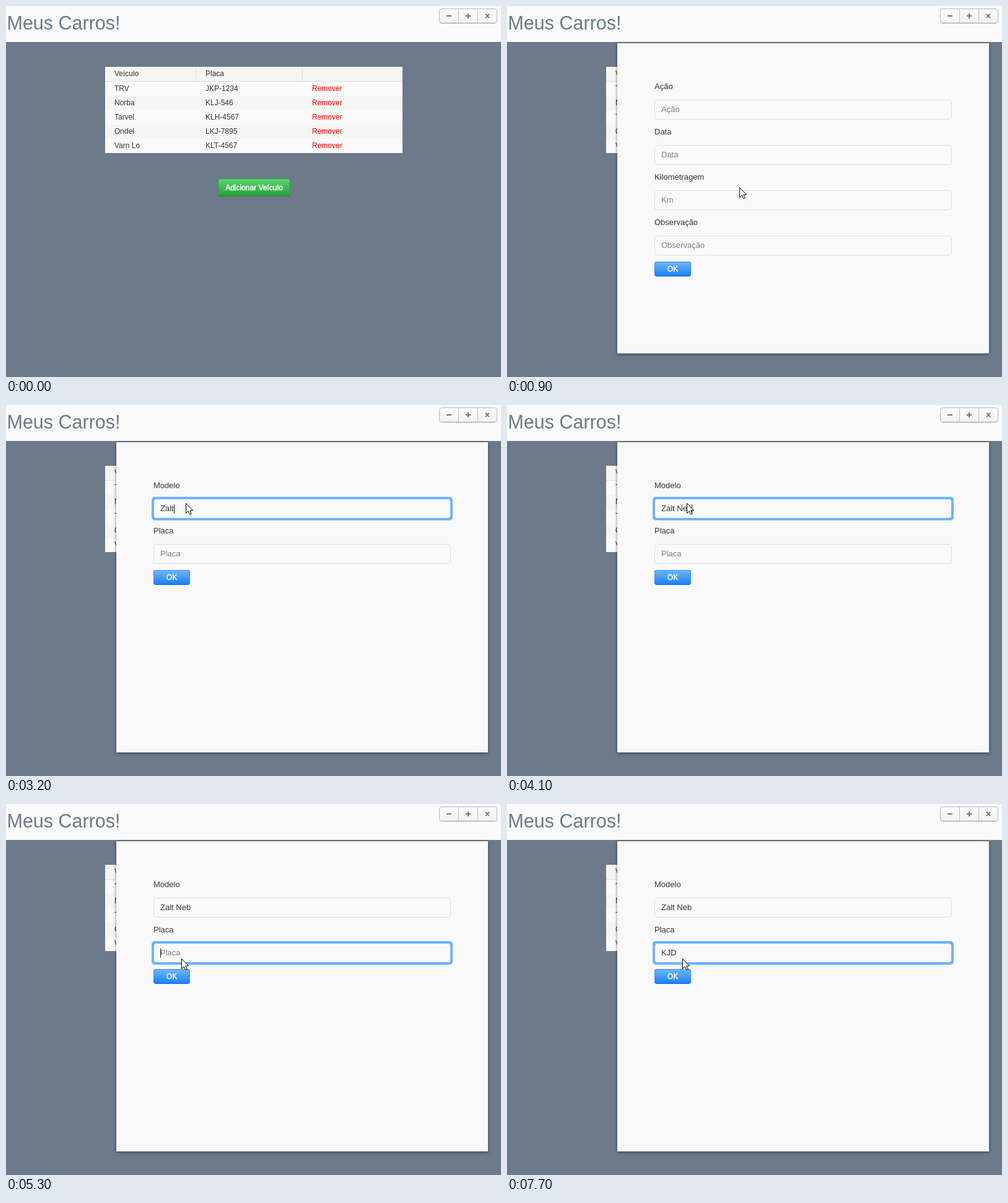
An HTML page for the animation above (8000 ms loop, 799 by 598 pixels).

```html
<!DOCTYPE html>
<html lang="pt">
<head>
<meta charset="utf-8">
<title>Meus Carros!</title>
<style>
html, body { margin: 0; width: 100%; height: 100%; overflow: hidden; background: #6c7a89; }
svg { display: block; }
text { font: 12px "Liberation Sans", Arial, sans-serif; fill: #333; white-space: pre; }
.form text { font-size: 13px; }
.form .hint { fill: #7f7f7f; }
.remove { fill: #f00; }
text.title { font-size: 30.5px; fill: #6c7a89; }
.form text.btn, text.btn { font-size: 12px; fill: #fff; stroke: #fff; stroke-width: .45px; text-anchor: middle; }
.modal { filter: drop-shadow(0 1px 2.5px rgba(0,0,0,.5)); }
</style>
</head>
<body>
<svg width="799" height="598" viewBox="0 0 799 598">
  <defs>
    <linearGradient id="green" x2="0" y2="1"><stop stop-color="#5bd46d"/><stop offset="1" stop-color="#29a03b"/></linearGradient>
    <linearGradient id="blue" x2="0" y2="1"><stop stop-color="#6eb4f7"/><stop offset="1" stop-color="#1a82fb"/></linearGradient>
    <linearGradient id="grey" x2="0" y2="1"><stop stop-color="#fcfcfc"/><stop offset="1" stop-color="#f1f1f1"/></linearGradient>
  </defs>
  <g id="page"></g>
  <g id="dialog" class="form"></g>
  <path id="mouse" d="M.5 .5V16.5L4.2 13L6.7 18.5L9.2 17.4L6.8 12H11.6Z" fill="#fff" stroke="#000"/>
</svg>
<script>
const LOOP = 8000, STEP = 100, BLINK = 500;
const $ = id => document.getElementById(id);

const rect = (x, y, w, h, fill, more = '') =>
  `<rect x="${x}" y="${y}" width="${w}" height="${h}" fill="${fill}" ${more}/>`;
const text = (x, y, s, cls = '') => `<text x="${x}" y="${y}" class="${cls}">${s}</text>`;

function button(x, y, w, h, label, color, edge, base) {
  return rect(x, y, w, h, base, 'rx="4"') +
    rect(x, y, w, h - 1, edge, 'rx="4"') +
    rect(x + 1, y + 1, w - 2, h - 2, `url(#${color})`, 'rx="3"') +
    text(x + w / 2, y + h / 2 + 4, label, 'btn');
}

function drawPage() {
  const cars = [['TRV', 'JKP-1234'], ['Norba', 'KLJ-546'], ['Tarvel', 'KLH-4567'],
    ['Ondel', 'LKJ-7895'], ['Varn Lo', 'KLT-4567']];
  let s = rect(0, 0, 799, 58, '#fafafa') + text(1.5, 38, 'Meus Carros!', 'title');

  s += rect(699, 5, 94, 24, '#000', 'rx="4" opacity=".06"') +
    rect(699.5, 4.5, 93, 23, 'url(#grey)', 'rx="4" stroke="#b9b7b9"') +
    rect(703, 27, 86, 1, '#a19fa1') +
    rect(730, 5, 1, 22, '#c2c0c2') + rect(761, 5, 1, 22, '#c2c0c2') +
    '<path d="M711 16H719M742 16H750M746 12V20M774 13L780 19M780 13L774 19" stroke="#737475" stroke-width="2"/>';

  s += rect(160, 98, 480, 139, '#fafafa') + rect(160, 98, 480, 23, '#f5f5f4') +
    rect(160, 121, 480, 1, '#ddd') +
    rect(306, 98, 1, 23, '#ddd') + rect(478, 98, 1, 23, '#ddd') +
    text(175, 113, 'Veículo') + text(322, 113, 'Placa');
  cars.forEach(([name, plate], i) => {
    const y = 122 + 23 * i;
    if (i % 2) s += rect(160, y, 480, 23, '#f5f5f4');
    s += text(175, y + 15, name) + text(322, y + 15, plate) + text(494, y + 15, 'Remover', 'remove');
  });
  $('page').innerHTML = s +
    button(342, 278, 117, 29, 'Adicionar Veículo', 'green', '#29a03b', '#248b34');
}

function field(row, label, hint, value, focused) {
  const y = 151 + 73 * row;
  return text(238, y - 17, label) +
    (focused ? rect(235, y - 3, 486, 38, '#6db3fd', 'rx="5"') : '') +
    rect(238.5, y + .5, 479, 31, '#f9f9f9', `rx="4" stroke="${focused ? '#6db3fd' : '#ddd'}"`) +
    text(249, y + 20, value || hint, value ? 'value' : 'hint');
}

// Text typed so far, with the time of the last key press
function typed(t, str, times) {
  const n = times.filter(k => k <= t).length;
  return { value: str.slice(0, n), last: n ? times[n - 1] : 0 };
}

function drawDialog(t) {
  const box = $('dialog');
  if (t < 900) { box.innerHTML = ''; return; }
  const ok = y => button(238, y, 59, 24, 'OK', 'blue', '#388df8', '#0866dc');
  let s = rect(178, 60, 600, 500, '#f9f9f9', 'class="modal"');

  if (t < 1000) {
    const rows = [['Ação', 'Ação'], ['Data', 'Data'], ['Kilometragem', 'Km'], ['Observação', 'Observação']];
    rows.forEach(([label, hint], i) => s += field(i, label, hint));
    box.innerHTML = s + ok(412);
    return;
  }

  const model = typed(t, 'Zalt Neb', [2600, 2900, 3000, 3200, 3400, 3700, 3900, 4100]);
  const plate = typed(t, 'KJD', [6200, 6700, 7200]);
  const focus = t < 1600 ? -1 : t < 5300 ? 0 : 1;
  box.innerHTML = s + field(0, 'Modelo', 'Modelo', model.value, focus === 0) +
    field(1, 'Placa', 'Placa', plate.value, focus === 1) + ok(266);

  if (focus < 0) return;
  const active = [model, plate][focus];
  const since = t - Math.max(active.last, [1600, 5300][focus]);
  if (Math.floor(since / BLINK) % 2) return;
  const width = active.value ? box.querySelectorAll('.value')[focus].getComputedTextLength() : 0;
  box.innerHTML += rect(Math.round(249 + width), 160 + 73 * focus, 1, 15, '#222');
}

const path = [[100, 520, 500], [400, 430, 350], [700, 378, 296], [800, 375, 292],
  [1000, 375, 292], [1300, 335, 205], [1500, 292, 160], [1600, 290, 158],
  [4400, 290, 158], [4600, 292, 158], [4700, 292, 158], [4800, 294, 189],
  [5000, 290, 228], [5100, 285, 250], [5200, 283, 253], [5300, 283, 249], [LOOP, 283, 249]];

function moveMouse(t) {
  const mouse = $('mouse');
  mouse.style.display = t < path[0][0] ? 'none' : '';
  const i = Math.max(1, path.findIndex(p => p[0] > t));
  const [t0, x0, y0] = path[i - 1], [t1, x1, y1] = path[i];
  const k = (t - t0) / (t1 - t0);
  const x = Math.round(x0 + (x1 - x0) * k), y = Math.round(y0 + (y1 - y0) * k);
  mouse.setAttribute('transform', `translate(${x} ${y})`);
}

let shown = -1;
function frame() {
  const t = Math.floor(performance.now() % LOOP / STEP) * STEP;
  if (t !== shown) {
    shown = t;
    drawDialog(t);
    moveMouse(t);
  }
  requestAnimationFrame(frame);
}
drawPage();
frame();
</script>
</body>
</html>
```
